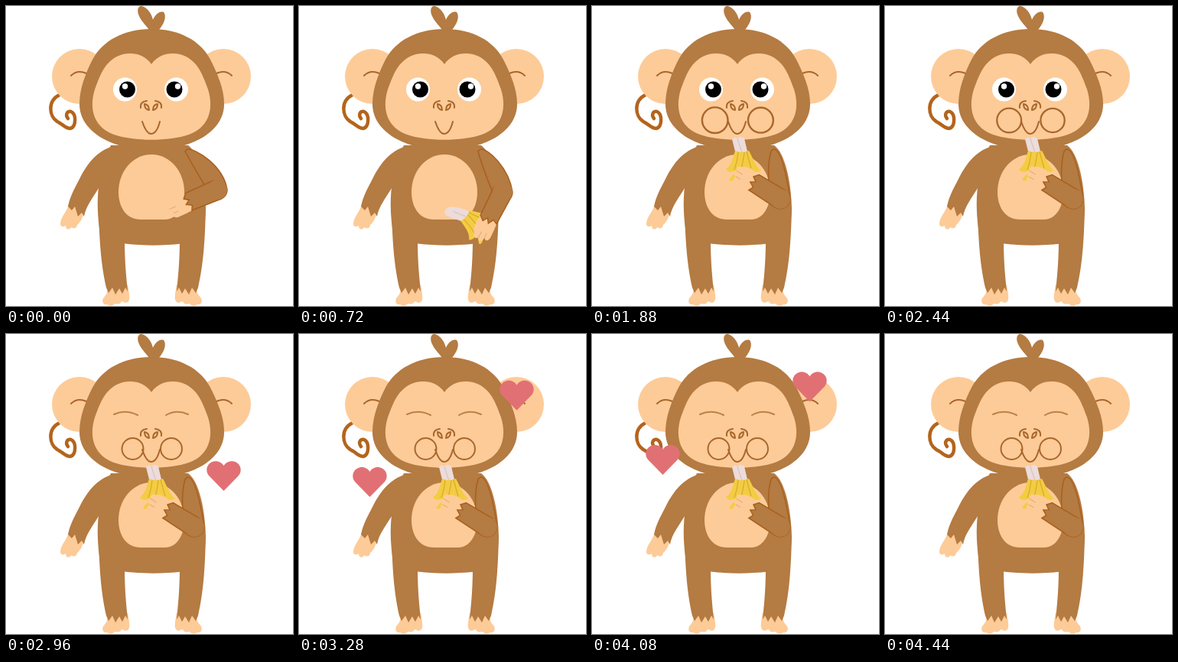
Recreate the animation shown at these times as an HTML page. Size 375 by 392 pixels, loop 4520 ms.

```html
<!DOCTYPE html>
<html lang="en">
<head>
<meta charset="utf-8">
<title>Monkey with a banana</title>
<style>
html, body { margin: 0; width: 100%; height: 100%; overflow: hidden; background: #fff; }
svg { display: block; width: 100vw; height: 100vh; }
.fur { fill: #b47b42; }
.skin { fill: #fdcb98; }
.line { fill: none; stroke: #a9672c; stroke-width: 2; stroke-linecap: round; stroke-linejoin: round; }
.edge { stroke: #a85f1c; stroke-width: 1.5; }
.heart { fill: #e17074; }
</style>
</head>
<body>
<svg viewBox="0 0 375 392">
  <defs>
    <path id="foot" class="skin" d="M133 364H159C161 376 163 384 159 387 156 389 153 386 151 386 149 391 144 389 142 389 139 393 134 391 132 390 127 391 125 386 127 382 131 377 133 376 133 364Z"/>
    <path id="leg" class="fur" d="M121 262C122 320 126 345 131 368L134 375 139 368 143 377 148 369 152 376 156 368 159 373C157 352 155 334 155 304Z"/>
    <path id="love" class="heart" d="M22.5 39L3 19C-2 13 0 3 9 .5 15-1 20 2 22.5 6 25 2 30-1 36 .5 45 3 47 13 42 19Z"/>
  </defs>

  <path class="line" style="stroke:#b4641c;stroke-width:4.5" d="M70 116C54 124 56 144 67 151 75 155 78 160 84 160 92 158 92 141 85 138 80 137 77 142 81 147"/>

  <!-- body -->
  <use href="#foot"/><use href="#leg"/>
  <g transform="translate(382 0) scale(-1 1)"><use href="#foot"/><use href="#leg"/></g>
  <path class="fur" d="M137 182H238C252 192 260 228 261 265L258 304C230 315 160 316 124 304 117 265 117 220 137 182Z"/>
  <path class="skin" d="M190 194C215 194 233 217 233 243 233 264 222 279 208 279H176C158 279 147 264 147 243 147 217 165 194 190 194Z"/>
  <path class="skin" d="M82 259C79 270 71 276 71 285 72 290 76 288 78 287 78 293 84 293 85 289 89 292 93 290 93 286 98 282 101 276 102 266Z"/>
  <path class="fur" d="M141 183C117 189 104 210 96 226 88 241 83 251 81 262L86 267 90 262 94 275 99 270 102 275C104 262 114 250 121 238L141 192Z"/>

  <!-- head -->
  <circle class="skin" cx="96" cy="92" r="36"/>
  <circle class="skin" cx="284" cy="92" r="36"/>
  <path class="line" d="M85 91Q93 83 105 88M295 91Q287 83 275 88"/>
  <path class="fur" d="M189 35C186 27 177 22 173 11 171 4 173 0 177 0 185 2 190 10 192 18 195 11 201 6 206 8 211 15 205 27 196 35Z"/>
  <path class="fur" d="M190 30C226 30 254 45 267 70 276 88 285 108 285 128 285 165 241 188 190 188 140 188 96 165 96 128 96 108 104 88 113 70 126 45 155 30 190 30Z"/>
  <path class="skin" d="M190 76C181 63 166 60 153 63 131 69 124 87 116 109 107 138 118 160 141 168 166 177 214 177 239 168 262 160 273 138 264 109 256 87 249 69 227 63 214 60 199 63 190 76Z"/>
  <g id="open">
    <circle cx="155.500" cy="109" r="15.500" fill="#fff"/><circle cx="158.500" cy="109" r="10.500"/><circle cx="155.500" cy="105" r="3.700" fill="#fff"/>
    <circle cx="222.500" cy="109" r="15.500" fill="#fff"/><circle cx="220" cy="109" r="10.500"/><circle cx="224.500" cy="105" r="3.700" fill="#fff"/>
  </g>
  <path id="shut" class="line" style="stroke:#bd8049" d="M141 105Q156 98 172 106M209 106Q223 98 238 105"/>
  <path class="line" d="M176 133Q175 125 184 124M203 133Q204 125 195 124M181 128Q187 129 187 136 181 135 181 128ZM198 128Q192 129 192 136 198 135 198 128Z"/>
  <path class="line" d="M178 151C181 160 185 167 189.500 167 195 167 199 159 201 151"/>
  <g id="cheeks" class="line"><circle/><circle/></g>

  <!-- right arm and banana -->
  <path id="upper" class="fur edge"/>
  <g id="banana">
    <path id="flesh" fill="#ecdcda"/>
    <path fill="none" stroke="#dcc6c6" stroke-width="1.300" d="M-6-21Q-3-10 1 0"/>
    <path fill="#f4cc43" d="M-9-5Q0-1 9-5C14 4 18 16 25 21 18 25 12 22 9 18 7 25 0 30-4 24-6 32-12 36-16 34-19 32-10 28-10 22-15 24-20 22-21 19-13 14-12 4-9-5Z"/>
    <path fill="none" stroke="#d9ac2d" stroke-width="1.300" d="M-5-3Q-6 9-10 20M3-3Q2 8-2 22M6-4Q9 8 12 18"/>
  </g>
  <g id="fore">
    <path class="skin" d="M36-11C45-13 54-13 60-13 66-13 68-9 64-6 71-6 73 0 67 1 72 4 69 9 64 9 60 14 47 13 36 11Z"/>
    <path class="line" style="stroke:#e9ae78;stroke-width:1.200" d="M64-6H58M67 1H59"/>
    <path class="fur edge" d="M0-13L41-12 38-6 45-2 39 2 45 6 40 12 0 13Z"/>
    <circle class="fur" r="13"/>
  </g>

  <use id="heartR" href="#love"/>
  <use id="heartL" href="#love"/>
</svg>
<script>
const $ = id => document.getElementById(id);
const set = (el, attrs) => { for (const k in attrs) el.setAttribute(k, attrs[k]); };
const show = (el, on) => el.style.display = on ? '' : 'none';
const mix = (a, b, k) => a + (b - a) * k;
const clamp = k => Math.min(1, Math.max(0, k));
const ease = k => (1 - Math.cos(Math.PI * clamp(k))) / 2;

const LOOP = 4520, STEP = 40;

// time, elbow x y, forearm angle, banana x y, banana angle
const poses = [
  [0, 276, 240, 157, 243, 287, -45],
  [400, 276, 240, 101, 243, 287, -45],
  [600, 276, 240, 101, 243, 287, -45],
  [720, 266, 243, 117, 221, 277, -50],
  [1120, 248, 252, 188, 198, 217, -10],
  [1160, 247, 252, 195, 197, 211, -6],
  [1200, 246, 252, 212, 196, 194, 0],
  [LOOP, 246, 252, 212, 196, 194, 0]
];

function poseAt(t) {
  const i = poses.findIndex(p => p[0] > t), a = poses[i - 1], b = poses[i];
  const k = (t - a[0]) / (b[0] - a[0]);
  return a.map((v, n) => mix(v, b[n], k)).slice(1);
}

function drawArm(t) {
  const [ex, ey, turn, bx, by, tilt] = poseAt(t);
  set($('upper'), { d: `M234 190Q${.6 * ex + 80} 211 ${ex - 13} ${ey}A13 13 0 0 0 ${ex + 13} ${ey}` +
    `C${ex + 8} ${ey - 32} 247 186 237 187Z` });
  set($('fore'), { transform: `translate(${ex} ${ey}) rotate(${turn})` });
  set($('banana'), { transform: `translate(${bx} ${by}) rotate(${tilt})` });
  show($('banana'), t >= 640);
  set($('flesh'), { d: t >= 1560
    ? 'M-8 0L-13-20Q-10-24-6-21-2-25 3-21L8 0Z'
    : 'M-8 0C-10-9-14-16-16-24-16-31-6-31-3-26 3-18 7-9 8 0Z' });
}

function drawCheeks(t) {
  const k = Math.sin(Math.PI * clamp((t - 1560) / 1080));
  const [left, right] = $('cheeks').children;
  set(left, { cx: mix(165.5, 159.5, k), cy: mix(150, 149, k), r: mix(14, 17.5, k) });
  set(right, { cx: mix(216, 221.5, k), cy: mix(150, 149, k), r: mix(14, 17, k) });
  $('cheeks').style.strokeWidth = mix(2, 2.5, k);
  show($('cheeks'), t >= 1560);
}

// Each heart rises twice, 740 ms apart
function drawHeart(el, t, start, life, span, x, from, to) {
  const age = t - start, phase = age % 740;
  show(el, age >= 0 && age < 1480 && phase < life);
  set(el, { transform: `translate(${x} ${mix(from, to, ease(phase / span))})` });
}

function frame(now) {
  const t = Math.floor(now % LOOP / STEP) * STEP;
  drawArm(t);
  drawCheeks(t);
  show($('open'), t < 2680);
  show($('shut'), t >= 2680);
  drawHeart($('heartR'), t, 2680, 740, 760, 262, 219, 42);
  drawHeart($('heartL'), t, 3020, 680, 680, 70, 243, 27);
}

const origin = performance.now();
function tick() {
  frame(performance.now() - origin);
  requestAnimationFrame(tick);
}
tick();
</script>
</body>
</html>
```
